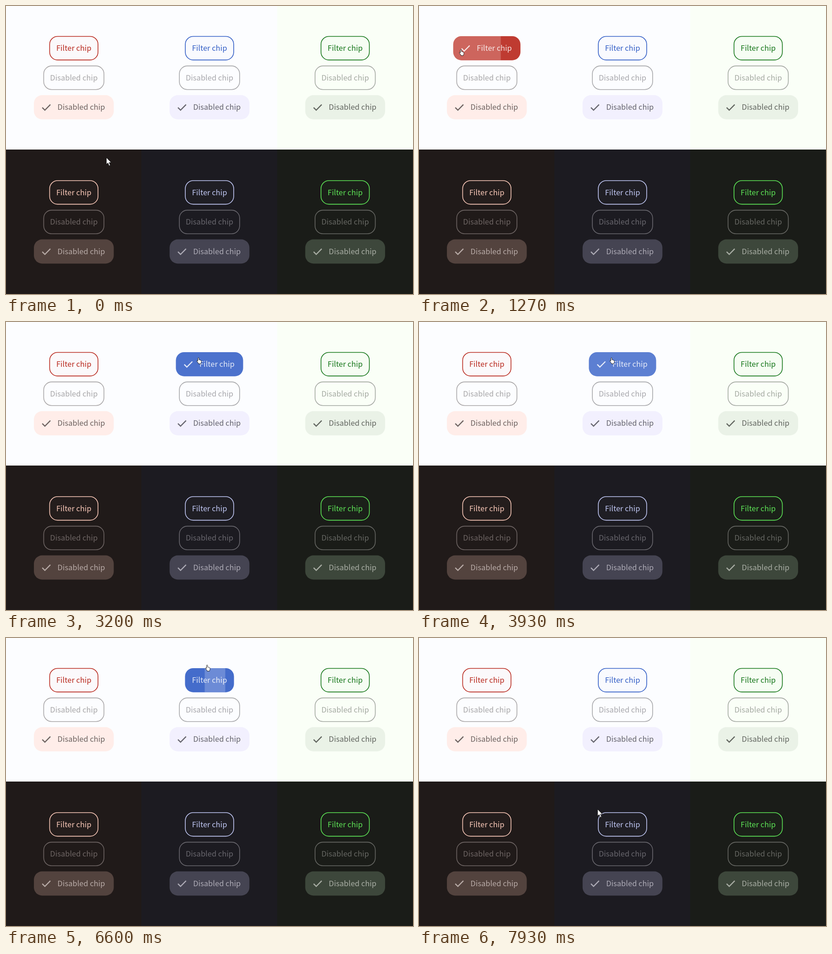
These frames come from a looping animation (890x630 px, 8 s). An HTML page with a canvas:

```html
<!DOCTYPE html>
<html lang="en">
<head>
<meta charset="utf-8">
<title>Filter chips</title>
<style>
  html, body { margin: 0; width: 100%; height: 100%; overflow: hidden; }
  canvas { display: block; }
</style>
</head>
<body>
<canvas id="stage" width="890" height="630"></canvas>
<script>
const g = document.getElementById('stage').getContext('2d');
const LOOP = 8000, TICK = 1000 / 15, COL = 890 / 3, ROW = 314.6;
const CHIP_H = 52.8, RADIUS = 18, ROW_GAP = 64.6;
const FONT = '16.5px "Noto Sans CJK JP", "Noto Sans CJK SC", "Noto Sans CJK", "Open Sans", sans-serif';

// Light row, then dark row
const themes = [
  { bg: '#fcfdff', ink: '#201a19', accent: '#b92a1f', fill: '#ffede9' },
  { bg: '#fcfdff', ink: '#1c1b21', accent: '#345fc6', fill: '#f2f0fe' },
  { bg: '#fafff7', ink: '#1a1c18', accent: '#17771b', fill: '#eaf2e7' },
  { bg: '#201a19', ink: '#ede0dd', accent: '#f9c8b8', fill: '#53433e' },
  { bg: '#1c1b21', ink: '#e4e1e9', accent: '#bfc6f2', fill: '#454452' },
  { bg: '#1a1c18', ink: '#e2e3dc', accent: '#5de356', fill: '#3d473b' }
];

// Ticks at which each chip is toggled
const clicks = [[18, 30], [43, 49, 56, 62, 97, 99, 103, 110]];

// Pointer glides: first tick, last tick, destination
const home = [219, 331];
const glides = [
  [0, 2, 48, 490], [3, 6, 22, 535], [6, 16, 87, 94], [33, 36, 243, 88],
  [36, 38, 416, 77], [61, 65, 441, 205], [75, 77, 449, 153],
  [79, 80, 425, 129], [92, 95, 435, 58], [114, 119, 390, 374]
];

const arrow = new Path2D('M0 0V15L3.4 11.8 6 18 8.6 16.9 6 10.9H10.6Z');
const hand = new Path2D('M3 1.8Q3.2.6 4.3.6T5.4 1.8V5.2Q7 4.7 7.4 5.8 8.8 5.4 9.2 6.5 10.6 6.3 10.6 7.8V10.2Q10.4 12 9.4 12.8V14H4.4V12.9Q2.4 10.6.8 8.2.4 7 1.4 6.9 2.3 6.9 3 8Z');

function pointer(n) {
  let [x, y] = home;
  for (const [from, to, tx, ty] of glides) {
    const k = Math.min(1, Math.max(0, (n - from) / (to - from)));
    const ease = k * k * (3 - 2 * k);
    x += (tx - x) * ease;
    y += (ty - y) * ease;
  }
  return [x, y];
}

function withAlpha(alpha, paint) {
  g.save();
  g.globalAlpha = alpha;
  paint();
  g.restore();
}

function chipPath(x, y, w, inset = 0) {
  g.beginPath();
  g.roundRect(x + inset, y + inset, w - 2 * inset, CHIP_H - 2 * inset, RADIUS - inset);
}

function fillChip(x, y, w, color) {
  g.fillStyle = color;
  chipPath(x, y, w);
  g.fill();
}

function outline(x, y, w, color) {
  g.strokeStyle = color;
  g.lineWidth = 1.6;
  chipPath(x, y, w, .6);
  g.stroke();
}

function content(text, x, y, w, checked, color) {
  g.font = FONT;
  g.fillStyle = g.strokeStyle = color;
  g.textAlign = checked ? 'left' : 'center';
  g.fillText(text, checked ? x + 51.5 : x + w / 2, y + 32.2);
  if (!checked) return;
  g.lineWidth = 2.4;
  g.beginPath();
  g.moveTo(x + 18.3, y + 27);
  g.lineTo(x + 24, y + 32.7);
  g.lineTo(x + 36, y + 20.6);
  g.stroke();
}

const chipWidth = on => on ? 147 : 107;

function isHovered(cx, y, w, n) {
  const [px, py] = pointer(n - 1.5), slack = 10;
  return Math.abs(px - cx) < w / 2 + slack &&
    py > y - slack && py < y + CHIP_H + slack;
}

// A bar that widens from the pressed spot, then fades
function ripple(cx, x, y, w, start, n) {
  const dt = (n - start) * TICK, r = 22.5 + 1.31 * dt;
  const pressed = pointer(start)[0] + 2 - (cx - (254 - w) / 2);
  if (dt >= 400) return;
  withAlpha(.21 * Math.min(1, (400 - dt) / 333), () => {
    chipPath(x, y, w);
    g.clip();
    g.fillStyle = '#fff';
    g.fillRect(x + pressed - r, y, 2 * r, CHIP_H);
  });
}

function filterChip({ accent }, toggles, cx, y, n) {
  const past = toggles.filter(k => k <= n);
  const on = past.length % 2 === 1;
  // Colours follow the layout one tick later
  const lit = toggles.filter(k => k < n).length % 2 === 1;
  const w = chipWidth(on), x = cx - w / 2;

  if (lit) fillChip(x, y, w, accent);
  withAlpha(isHovered(cx, y, w, n) ? .08 : .015, () => fillChip(x, y, w, lit ? '#fff' : accent));
  if (lit) ripple(cx, x, y, w, past.at(-1), n);
  else outline(x, y, w, accent);
  content('Filter chip', x, y, w, on, lit ? 'rgba(255,255,255,.85)' : accent);
}

function panel(theme, i, n) {
  const col = i % 3, dark = i > 2, left = Math.floor(col * COL);
  const cx = (col + .5) * COL, y = dark ? 381.4 : 65.9;
  g.fillStyle = theme.bg;
  g.fillRect(left, dark ? Math.floor(ROW) : 0, 890 - left, 630);

  filterChip(theme, (!dark && clicks[col]) || [], cx, y, n);
  withAlpha(.38, () => {
    outline(cx - 66.5, y + ROW_GAP, 133, theme.ink);
    content('Disabled chip', cx - 66.5, y + ROW_GAP, 133, false, theme.ink);
  });
  const w = 174.6, x = cx - w / 2, bottom = y + 2 * ROW_GAP;
  fillChip(x, bottom, w, theme.fill);
  withAlpha(.66, () => content('Disabled chip', x, bottom, w, true, theme.ink));
}

function cursor(n) {
  const [x, y] = pointer(n);
  const isArrow = n < 14 || y > 250;
  const shape = isArrow ? arrow : hand;
  g.save();
  g.translate(x + .5, y + .5);
  g.lineJoin = 'round';
  g.lineWidth = .9;
  g.fillStyle = '#fff';
  g.strokeStyle = '#111';
  g.fill(shape);
  g.stroke(shape);
  g.restore();
}

const begin = performance.now();

function draw() {
  const t = (performance.now() - begin) % LOOP;
  const n = Math.min(119, Math.floor(t / TICK + .06));
  themes.forEach((theme, i) => panel(theme, i, n));
  cursor(n);
  requestAnimationFrame(draw);
}

draw();
</script>
</body>
</html>
```
